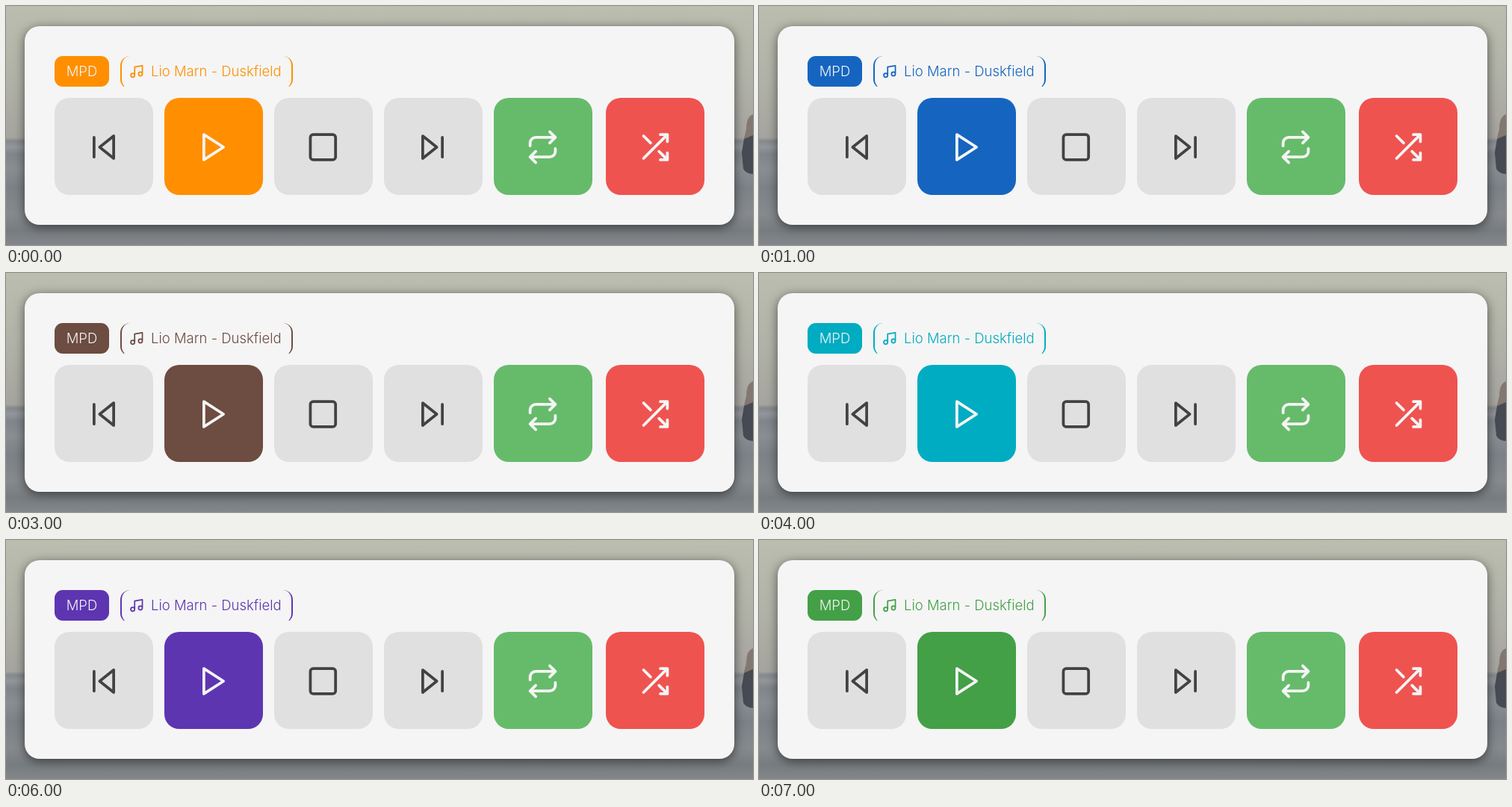
Write an HTML page that moves like this. It is 1000 by 320 pixels and loops after 8000 ms.

```html
<!DOCTYPE html>
<html lang="en">
<head>
<meta charset="utf-8">
<title>Music player</title>
<style>
  html, body { margin: 0; width: 100%; height: 100%; overflow: hidden; }
  #stage { position: relative; width: 1000px; height: 320px; overflow: hidden; --accent: #ff8f00;
    background: linear-gradient(#bbbdaf, #b1b2a7 30%, #a5a49f 55%, #85898d 56.5%, #92969a 59%,
      #7f858b 62%, #898e92 68%, #7b8187 76%, #868a8d 87%, #777c80 94%, #83878a); }
  #card { position: absolute; left: 25px; top: 27px; width: 950px; height: 266px;
    border-radius: 20px; background: #f5f5f5; box-shadow: 0 3px 14px rgba(0, 0, 0, .55); }
  #badge, #song { position: absolute; top: 67px; height: 41px; line-height: 41px;
    font: 300 18.5px/41px Inter, sans-serif; white-space: nowrap; box-sizing: border-box; }
  #badge { left: 65px; width: 73px; border-radius: 11px; text-align: center;
    background: var(--accent); color: #f5f5f5; }
  #song { left: 153px; width: 231px; height: 44px; padding-left: 39px; color: var(--accent);
    border: solid var(--accent); border-width: 0 2px; border-radius: 13px;
    clip-path: inset(0 0 3px); }
  svg { position: absolute; left: 0; top: 0; }
  .icon { fill: none; stroke-width: 2; stroke-linecap: round; stroke-linejoin: round; }
</style>
</head>
<body>
<div id="stage">
  <svg width="1000" height="320">
    <path d="M1000 145q-9 3-9 20l-3 12 12 10z" fill="#837771"/>
    <path d="M1000 173l-12 5-3 18 2 22q4 7 13 7z" fill="#484a53"/>
  </svg>
  <div id="card"></div>
  <div id="badge">MPD</div>
  <div id="song">Lio Marn - Duskfield</div>
  <svg id="controls" width="1000" height="320"></svg>
</div>
<script>
  const stage = document.getElementById('stage');
  const controls = document.getElementById('controls');
  const grey = '#e0e0e0', dark = '#424242', light = '#f5f5f5';

  // Icons are drawn on a 24-unit grid: left edge, fill, stroke, icon centre, path.
  const buttons = [
    [65, grey, dark, 131, 'M19 20L9 12l10-8zM5 19V5'],
    [212, 'var(--accent)', light, 278, 'M5 3l14 9-14 9z'],
    [359, grey, dark, 424.3, 'M5 3h14a2 2 0 0 1 2 2v14a2 2 0 0 1-2 2H5a2 2 0 0 1-2-2V5a2 2 0 0 1 2-2z'],
    [506, grey, dark, 571, 'M5 4l10 8-10 8zM19 5v14'],
    [653, '#66bb6a', light, 718.5, 'M17 1l4 4-4 4M3 11V9a4 4 0 0 1 4-4h14M7 23l-4-4 4-4M21 13v2a4 4 0 0 1-4 4H3'],
    [803, '#ef5350', light, 868.5, 'M16 3h5v5M4 20L21 3M21 16v5h-5M15 15l6 6M4 4l5 5'],
  ];
  const note = 'M9 18V5l12-2v13M9 18a3 3 0 1 1-6 0a3 3 0 1 1 6 0M21 16a3 3 0 1 1-6 0a3 3 0 1 1 6 0';

  const icon = (path, x, y, scale, color) =>
    `<path class="icon" d="${path}" style="stroke:${color}"
      transform="translate(${x} ${y}) scale(${scale}) translate(-12 -12)"/>`;

  controls.innerHTML = icon(note, 174.8, 87.6, 0.86, 'var(--accent)') +
    buttons.map(([x, fill, stroke, cx, path]) =>
      `<rect x="${x}" y="123" width="132" height="130" rx="20" style="fill:${fill}"/>` +
      icon(path, cx, 189, 1.875, stroke)).join('');

  const accents = ['#ff8f00', '#1565c0', '#607d8b', '#6d4c41',
                   '#00acc1', '#f4511e', '#5e35b1', '#43a047'];

  function draw() {
    const step = Math.floor(performance.now() / 1000) % accents.length;
    stage.style.setProperty('--accent', accents[step]);
    requestAnimationFrame(draw);
  }
  draw();
</script>
</body>
</html>
```
